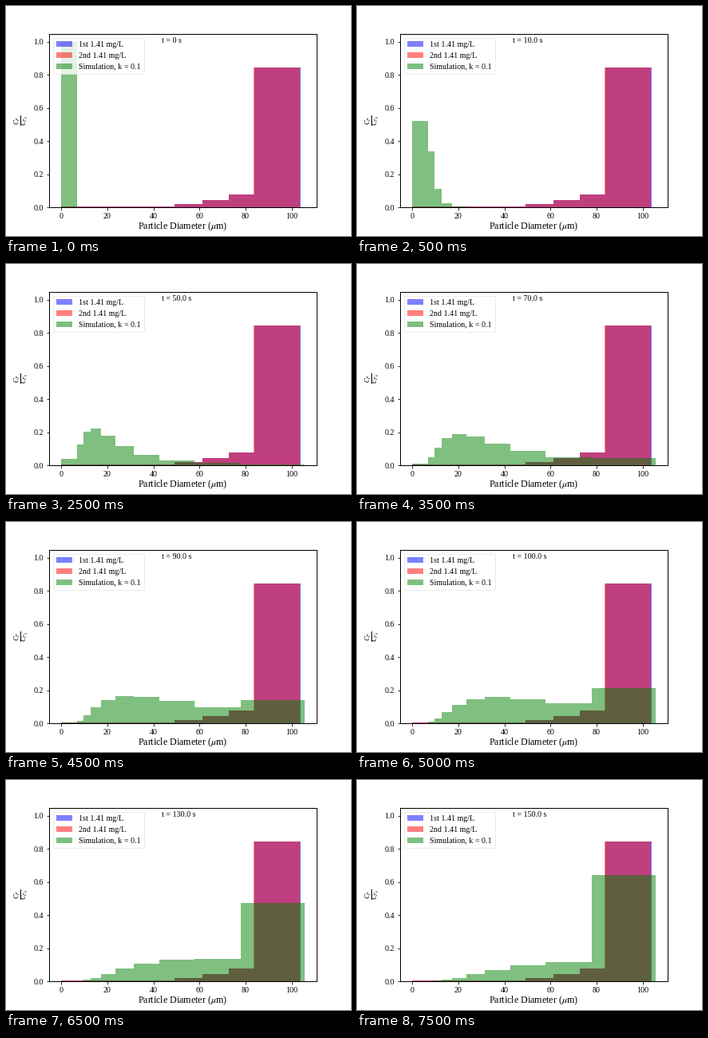
Recreate the animation shown at these times as a matplotlib script. Size 432 px wide and 288 px high, loop 8000 ms.

```python
import math

import matplotlib.pyplot as plt
import numpy as np
from matplotlib.animation import FuncAnimation

plt.rcParams.update({
    "font.family": "Liberation Serif",
    "mathtext.fontset": "stix",
    "font.size": 10,
    "axes.linewidth": 1,
    "legend.edgecolor": "0.9",
})

RATE = 0.0653      # mean growth steps per second
STEP = 10          # simulated seconds per frame
FRAMES = 16

SIM_EDGES = [0, 6.86, 9.63, 12.75, 17.26, 23.5, 31.5, 42.6, 57.8, 77.9, 105.5]
FIRST_EDGES = [0, 49.1, 61.3, 72.7, 83.8, 103.9]
SECOND_EDGES = [0, 49.1, 61.3, 72.7, 83.5, 103.6]
MEASURED = [0.004, 0.02, 0.044, 0.078, 0.845]


def size_distribution(t):
    """Poisson growth chain; the last class collects the tail."""
    mean = RATE * t
    p = [math.exp(-mean) * mean**n / math.factorial(n)
         for n in range(len(SIM_EDGES) - 2)]
    return p + [1 - sum(p)]


def histogram(ax, edges, heights, color, label):
    return ax.bar(edges[:-1], heights, np.diff(edges), align="edge",
                  color=color, alpha=0.5, label=label)


fig, ax = plt.subplots(figsize=(6, 4), dpi=72)
fig.subplots_adjust(left=0.125, right=0.9, bottom=0.125, top=0.88)

histogram(ax, FIRST_EDGES, MEASURED, "blue", "1st 1.41 mg/L")
histogram(ax, SECOND_EDGES, MEASURED, "red", "2nd 1.41 mg/L")
sim = histogram(ax, SIM_EDGES, size_distribution(0), "green",
                "Simulation, k = 0.1")

margin = 0.05 * SIM_EDGES[-1]
ax.set_xlim(-margin, SIM_EDGES[-1] + margin)
ax.set_ylim(0, 1.05)
ax.set_xlabel(r"Particle Diameter ($\mu$m)", fontsize=12, labelpad=1)
ax.set_ylabel(r"$\frac{C_P}{C_{P_0}}$", fontsize=12, labelpad=3)
ax.legend(loc="upper left")
clock = ax.text(0.42, 0.947, "", transform=ax.transAxes)


def update(i):
    t = i * STEP
    for bar, height in zip(sim, size_distribution(t)):
        bar.set_height(height)
    clock.set_text(f"t = {t:.1f} s" if i else "t = 0 s")
    return [*sim, clock]


anim = FuncAnimation(fig, update, frames=FRAMES, interval=500,
                     repeat=True, repeat_delay=0)
plt.show()
```
